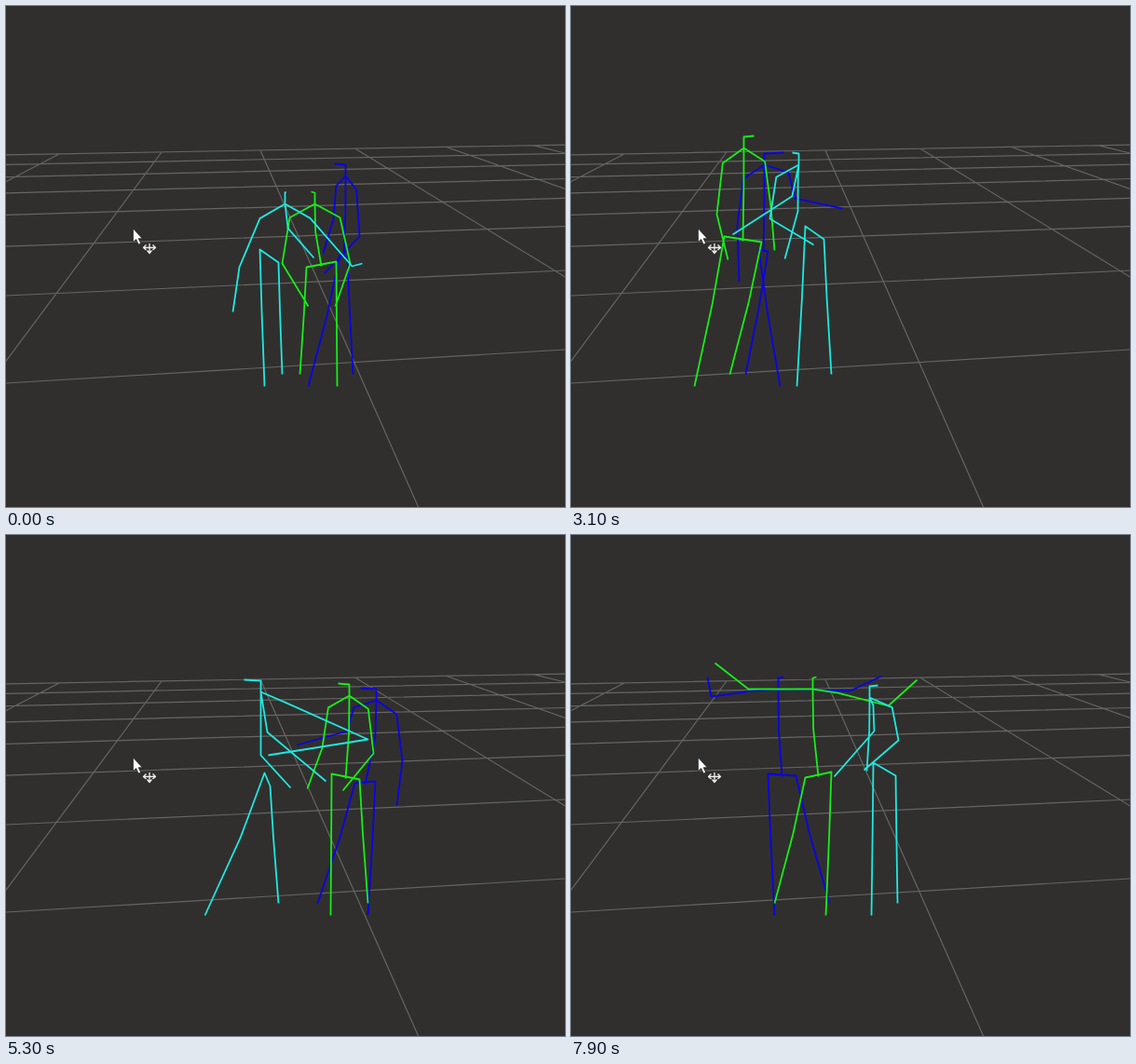
Animation, 600 px wide and 538 px high, one loop 8 s. Source, as an HTML page:

```html
<!DOCTYPE html>
<html lang="en">
<head>
<meta charset="utf-8">
<title>Three skeletons on a grid</title>
<style>
html, body { margin: 0; width: 100%; height: 100%; overflow: hidden; background: #302f2e; }
svg { display: block; width: 600px; height: 538px; }
path { fill: none; stroke-linejoin: round; }
#grid { stroke: #656564; stroke-width: 1.2; }
#bodies { stroke-width: 1.8; }
#pointer { fill: #fff; stroke: #222; stroke-width: .7; }
#move { stroke: #eee; stroke-width: 1.3; }
</style>
</head>
<body>
<svg viewBox="0 0 600 538">
  <path id="grid"/>
  <g id="bodies" transform="translate(.5 .5)"></g>
  <path id="pointer" d="M136.5 239V253.5L139.7 250.6 142.2 256 144.6 254.9 142.2 249.7H146.2Z"/>
  <path id="move" d="M148 259.5H160M154 255V265M150.5 256.5L147.5 259.5 150.5 262M157.5 256.5L160.5 259.5 157.5 262M151.5 262.5L154 265.5 156.5 262.5"/>
</svg>
<script>
const LOOP = 8000, STEP = 100, GAIT = 10;
const NEAR_FLOOR = 408, FAR_FLOOR = 395, SHOULDER = 27;

// tilt: how far each hip sits above or below the pelvis centre
const BODIES = [
  { color: '#0b03e2', tilt: 1 },
  { color: '#17ee17', tilt: 3 },
  { color: '#1ee9df', tilt: 7 }
];

const poses = [];
const pose = (time, ...bodies) =>
  poses.push({ time, bodies: bodies.map(s => s.split(/[ ,]+/).map(Number)) });

// Each body: neck, elbow, hand, elbow, hand, pelvis,
// near and far foot x, half hip width and nose offset, spine lean if any
pose(0,
  '364,182 351,228 340,265 379,247 341,287 362,268 324,372 4,-12',
  '331,212 296,276 324,322 369,276 353,322 338,277 355,315 -16,-4',
  '299,212 250,280 243,328 371,279 382,276 282,268 277,296 10,1 48');
pose(1300,
  '227,160 207,213 190,258 249,222 240,260 236,250 239,227 -6,-21',
  '317,163 296,218 267,261 336,228 323,275 311,256 303,339 -6,-14',
  '325,217 297,280 311,325 376,235 344,305 330,279 319,348 12,-8 29');
pose(3100,
  '207,170 178,235 180,296 240,206 291,217 206,262 224,187 5,21',
  '185,152 156,223 168,272 214,215 218,262 184,250 132,170 20,11',
  '244,170 243,220 229,271 213,228 260,256 261,243 242,279 10,-7 -88');
pose(4500,
  '342,175 307,235 307,284 388,220 388,255 344,263 355,346 14,-3',
  '282,172 294,229 334,264 289,225 304,265 277,258 231,299 6,12',
  '223,164 184,237 191,299 284,224 276,219 229,256 230,190 4,20 47');
pose(5300,
  '397,177 366,210 312,225 425,242 419,290 385,265 388,334 -11,-17',
  '368,172 339,228 323,272 394,234 361,274 364,259 348,388 15,-12',
  '273,168 273,236 305,271 388,219 281,236 280,262 213,292 3,-18 63');
pose(6500,
  '318,171 264,194 210,207 349,212 357,290 311,268 268,331 -6,0',
  '351,169 355,223 306,235 354,224 338,264 360,260 389,333 -11,-13',
  '332,171 314,224 309,282 425,239 335,252 337,257 334,353 18,-7 47');
pose(7900,
  '222,165 150,173 146,152 299,167 333,151 226,257 218,277 15,6',
  '259,165 190,165 154,137 340,183 371,155 265,257 273,218 -14,4',
  '320,174 325,210 282,259 351,220 314,252 336,251 322,350 12,9 -19');

const last = poses.length - 1;
const clamp = (n, low, high) => Math.max(low, Math.min(high, n));
const mix = (a, b, x, y = x) => [a[0] + (b[0] - a[0]) * x, a[1] + (b[1] - a[1]) * y];
const line = (...pts) => 'M' + pts.map(p => p.map(n => n.toFixed(1)).join(' ')).join('L');

function slope(k, value) {
  const a = poses[clamp(k - 1, 0, last)], b = poses[clamp(k + 1, 0, last)];
  return 0.65 * (value(b) - value(a)) / (b.time - a.time);
}

// Smooth curve through the poses
function blend(k, u, value) {
  const a = poses[k], b = poses[k + 1], v = 1 - u;
  return v * v * (1 + 2 * u) * value(a) + u * u * (3 - 2 * u) * value(b)
    + (b.time - a.time) * u * v * (v * slope(k, value) - u * slope(k + 1, value));
}

function arm(neck, elbow, hand) {
  const reach = clamp(0.78 * (elbow[0] - neck[0]), -SHOULDER, SHOULDER);
  const shoulder = [neck[0] + reach, neck[1] + 0.23 * (elbow[1] - neck[1])];
  return line(neck, shoulder, elbow, hand);
}

function skeleton(n, tilt, swing) {
  const [neck, elbowA, handA, elbowB, handB, pelvis, feet, [hip, nose]] =
    Array.from({ length: 8 }, (_, i) => n.slice(2 * i, 2 * i + 2));
  const lean = n[16] || 0;
  const head = [neck[0], neck[1] - 12];
  const base = [pelvis[0] + lean, pelvis[1] + 2];
  const nearHip = [pelvis[0] - hip, pelvis[1] - tilt];
  const farHip = [pelvis[0] + hip, pelvis[1] + tilt];
  const nearFoot = [feet[0] + swing, NEAR_FLOOR];
  const farFoot = [feet[1] - swing, FAR_FLOOR];
  const knee = (hip, foot) => mix(hip, foot, 0.4, 0.45);
  return line([head[0] + nose, head[1] - 1], head, neck, mix(neck, base, 0.1, 0.45), base)
    + arm(neck, elbowA, handA) + arm(neck, elbowB, handB)
    + line(nearFoot, knee(nearHip, nearFoot), nearHip, farHip, knee(farHip, farFoot), farFoot);
}

const paths = BODIES.map(({ color }) => {
  const path = document.createElementNS('http://www.w3.org/2000/svg', 'path');
  path.setAttribute('stroke', color);
  return document.getElementById('bodies').appendChild(path);
});

// Floor in perspective: rows recede to the horizon, columns to one point
function grid() {
  const horizon = 70, vanish = [234, 67], rows = 8;
  const row = (first, second, k) => {
    const a = 1 / (first - horizon), b = 1 / (second - horizon);
    return horizon + 1 / (a + (b - a) * k);
  };
  let d = '';
  for (let k = 0; k < rows; k++) d += line([0, row(405, 311, k)], [600, row(369, 284, k)]);
  for (let i = 0; i < 6; i++) {
    const x = 57 + 112 * i - 2 * i * i;
    const far = [x, 160 - 0.018 * x];
    d += line(far, mix(vanish, far, 8));
  }
  document.getElementById('grid').setAttribute('d', d);
}

function draw() {
  const time = Math.floor(performance.now() % LOOP / STEP) * STEP;
  let k = 0;
  while (k < last - 1 && time >= poses[k + 1].time) k++;
  const span = poses[k + 1].time - poses[k].time;
  const u = Math.min(1, (time - poses[k].time) / span);
  const swing = GAIT * Math.sin(2 * Math.PI * u * Math.round(span / 1000));
  BODIES.forEach(({ tilt }, b) => {
    const numbers = poses[0].bodies[b].map((_, i) => blend(k, u, p => p.bodies[b][i]));
    paths[b].setAttribute('d', skeleton(numbers, tilt, swing));
  });
  requestAnimationFrame(draw);
}

grid();
draw();
</script>
</body>
</html>
```
